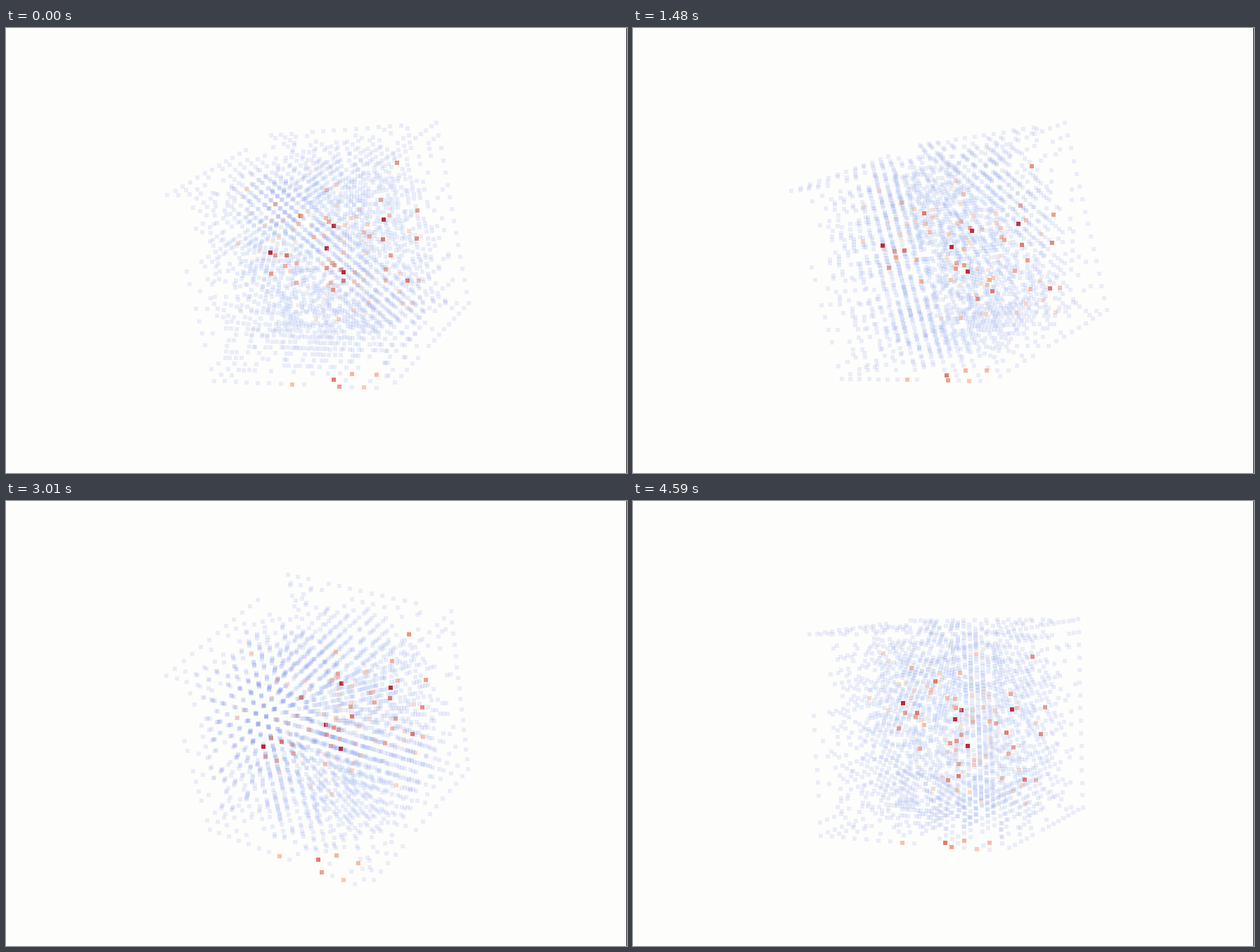
A matplotlib script for the animation above (4.63 s loop, 883 by 634 pixels).

```python
import numpy as np
import matplotlib.pyplot as plt
from matplotlib.animation import FuncAnimation

W, H, DPI = 883, 634, 100
FRAMES, LOOP = 100, 4630
N = 16                    # voxels per side
EDGE = 280                # cube edge in pixels
DIST = 1750               # camera distance in pixels
CENTRE = np.array([454, 319])
rng = np.random.default_rng(12)

# Drag path: frame, yaw, pitch, roll in degrees.
DRAG = np.array([
    (0, 32, 18, 12), (9, 32, 18.5, 12), (14, 33.2, 9.1, 12.4),
    (31, 42.4, 10.4, 13.8), (46, 48.5, 24, 14.7), (56, 47.5, 34, 13.8),
    (65, 41.6, 36.3, 11), (79, 30, 34.7, 4.1), (92, 29, 34, 3.5),
    (99, 27.7, 8.1, 2.2),
])

# Strongest voxels; weaker warm ones scatter around them.
DEEP = [(10, 13, 7), (6, 12, 7), (7, 1, 5), (8, 7, 7), (9, 7, 9)]
RED = [(10, 15, 13), (4, 15, 13), (9, 14, 9), (7, 6, 4), (7, 3, 6),
       (10, 1, 15)]


def build_cloud():
    idx = np.indices((N, N, N)).reshape(3, -1).T
    pos = idx - (N - 1) / 2
    rad = np.linalg.norm(pos, axis=1)
    rim = ((idx == 0) | (idx == N - 1)).sum(axis=1) >= 2

    # Faint outside, patchy blue inside, hollow in the middle.
    wave = np.cos(pos * [.9, .8, .7] + [.4, 1.3, 2.1]).sum(axis=1) / 3
    core = np.exp(-(rad / 8) ** 4)
    value = .035 + core * (.1 + .08 * wave + rng.exponential(.1, len(idx)))
    chance = np.select([rim, rad > 9.5, rad > 8, rad < 4, wave < -.35],
                       [.85, .3, .55, .4, .3], .72)
    keep = rng.random(len(idx)) < chance
    value = np.clip(value, .02, .55)

    def paint(cells, v):
        cells = np.clip(np.round(cells).astype(int), 0, N - 1)
        k = cells @ [N * N, N, 1]
        value[k], keep[k] = v, True

    seeds = np.array(DEEP + RED)
    near = np.repeat(seeds, 5, axis=0)
    near = near + rng.normal(0, 1.5, near.shape)
    paint(near, rng.uniform(.6, .85, len(near)))
    loose = rng.uniform(2, N - 3, (25, 3))
    paint(loose, rng.uniform(.55, .7, len(loose)))
    paint(RED, .88)
    paint(DEEP, .98)

    rgba = plt.get_cmap("coolwarm")(value)
    rgba[:, 3] = .09 + .87 * value ** 1.5
    return pos[keep] * EDGE / (N - 1), rgba[keep]


def turn(p, q, angle):
    c, s = np.cos(angle), np.sin(angle)
    return c * p + s * q, c * q - s * p


def project(i):
    yaw, pitch, roll = (np.radians(np.interp(i, DRAG[:, 0], col))
                        for col in DRAG.T[1:])
    a, b, y = points.T
    x, z = turn(a, b, yaw)
    z, y = turn(z, y, pitch)
    x, y = turn(x, y, roll)
    scale = 1 / (1 + z / DIST)
    return CENTRE + np.column_stack([x * scale, y * scale]), z


points, colors = build_cloud()

fig = plt.figure(figsize=(W / DPI, H / DPI), dpi=DPI, facecolor="#fdfdfc")
ax = fig.add_axes([0, 0, 1, 1])
ax.set(xlim=(0, W), ylim=(H, 0))
ax.axis("off")
ax.fill_between([W - 1, W], 0, H, color="#222222", lw=0, antialiased=False)
cloud = ax.scatter(points[:, 0], points[:, 1], marker="s",
                   s=(6 * 72 / DPI) ** 2, linewidths=0, antialiased=False)


def update(i):
    xy, depth = project(i)
    order = np.argsort(-depth)
    cloud.set_offsets(np.round(xy[order]))
    cloud.set_facecolors(colors[order])
    return [cloud]


anim = FuncAnimation(fig, update, frames=FRAMES, interval=LOOP / FRAMES,
                     repeat=True, repeat_delay=0)
plt.show()
```
